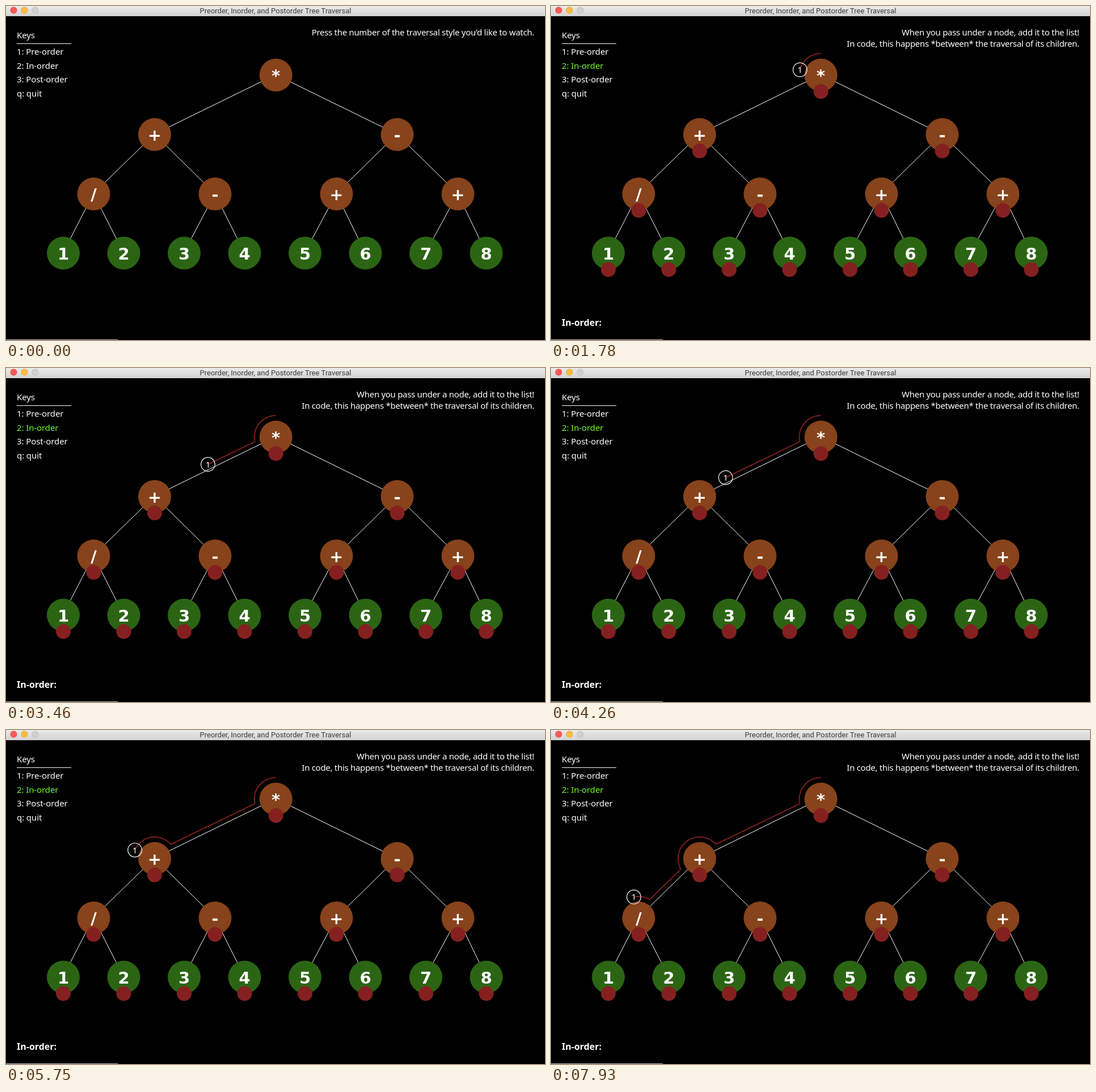
An HTML page with a canvas that plays this animation: 950 by 590 pixels, repeating every 7990 ms.

```html
<!DOCTYPE html>
<html lang="en">
<head>
<meta charset="utf-8">
<title>Tree Traversal</title>
<style>
  html, body { margin: 0; width: 100%; height: 100%; overflow: hidden; background: #000; }
  canvas { display: block; }
</style>
</head>
<body>
<canvas id="stage" width="950" height="590"></canvas>
<script>
const ctx = document.getElementById('stage').getContext('2d');
const LOOP = 7990, START = 1020, FIRST_TICK = 1310, TICK = 57.565;
const BROWN = '#87431b', GREEN = '#2b6514', RED = '#852020', LIME = '#73f930';
const SANS = '"Noto Sans", sans-serif';
const BODY = `15px ${SANS}`;
const NODE_RADIUS = 29, ORBIT = 38;

// Heap order: the children of node i are 2i + 1 and 2i + 2.
const levels = [
  { y: 122, x: 475.7, gap: 0 },
  { y: 227, x: 262, gap: 427.5 },
  { y: 332, x: 154.5, gap: 214 },
  { y: 436.5, x: 101, gap: 106.5 }
];
const nodes = [...'*+-/-++12345678'].map((label, i) => {
  const depth = Math.floor(Math.log2(i + 1));
  const { x, y, gap } = levels[depth];
  return { label, x: x + gap * (i + 1 - 2 ** depth), y, color: depth < 3 ? BROWN : GREEN };
});

function orbit(node, degrees) {
  const a = degrees * Math.PI / 180;
  return [node.x + ORBIT * Math.cos(a), node.y - ORBIT * Math.sin(a)];
}
const arc = (node, from, to) => k => orbit(node, from + (to - from) * k);
const line = ([x1, y1], [x2, y2]) => k => [x1 + (x2 - x1) * k, y1 + (y2 - y1) * k];

// Parts of the walk, timed in ticks.
const [root, left, , leftLeft] = nodes;
const route = [
  { from: -5, to: 12.6, at: arc(root, 90, 192.5) },
  { from: 13, to: 56, at: line(orbit(root, 192.5), orbit(left, 41.3)) },
  { from: 56, to: 86.6, at: arc(left, 41.3, 209.6) },
  { from: 86.6, to: 107, at: line(orbit(left, 209.6), orbit(leftLeft, 59)) },
  { from: 107, to: 115, at: arc(leftLeft, 59, 103) }
];

function walkerAt(tick) {
  const part = route.find(p => tick < p.to) || route[route.length - 1];
  const k = (tick - part.from) / (part.to - part.from);
  return part.at(Math.max(0, Math.min(1, k)));
}

// The walker advances in whole ticks, after two longer holds at the start.
function tickAt(t) {
  if (t < 1170) return -5;
  if (t < FIRST_TICK) return -2.4;
  return Math.floor((t - FIRST_TICK) / TICK + 0.15);
}

function disc(x, y, r, color) {
  ctx.fillStyle = color;
  ctx.beginPath();
  ctx.arc(x, y, r, 0, 2 * Math.PI);
  ctx.fill();
}

function strokePath(points, color, width) {
  ctx.strokeStyle = color;
  ctx.lineWidth = width;
  ctx.beginPath();
  points.forEach(([x, y]) => ctx.lineTo(x, y));
  ctx.stroke();
}

function write(text, x, y, { font = BODY, color = '#fff', align = 'left', spacing = 0 } = {}) {
  ctx.font = font;
  ctx.fillStyle = color;
  ctx.textAlign = align;
  ctx.letterSpacing = spacing + 'px';
  ctx.fillText(text, x, y);
}

function drawWindow() {
  ctx.fillStyle = '#000';
  ctx.fillRect(0, 0, 950, 590);
  const bar = ctx.createLinearGradient(0, 0, 0, 18);
  bar.addColorStop(0, '#ebebeb');
  bar.addColorStop(1, '#d2d2d2');
  ctx.fillStyle = bar;
  ctx.fillRect(0, 0, 950, 18);
  [['#fc5b57', '#df4744'], ['#fdbc40', '#dea034'], ['#d0d0d0', '#b8b8b8']].forEach(([fill, rim], i) => {
    disc(13.5 + 19 * i, 7.5, 6, rim);
    disc(13.5 + 19 * i, 7.5, 5.3, fill);
  });
  write('Preorder, Inorder, and Postorder Tree Traversal', 475, 12.5,
    { font: '13px Roboto, sans-serif', color: '#3c3c3c', align: 'center' });
  ctx.fillStyle = '#bbb';
  ctx.fillRect(0, 589, 197, 1);
}

function drawText(running) {
  const keys = { spacing: -0.1 };
  write('Keys', 19, 57, keys);
  strokePath([[19, 66.5], [115, 66.5]], '#fff', 1);
  ['1: Pre-order', '2: In-order', '3: Post-order', 'q: quit'].forEach((text, i) =>
    write(text, 19, Math.round(86 + 24.7 * i), { ...keys, color: running && i === 1 ? LIME : '#fff' }));

  const message = running
    ? ['When you pass under a node, add it to the list!',
       'In code, this happens *between* the traversal of its children.']
    : ["Press the number of the traversal style you'd like to watch."];
  message.forEach((text, i) =>
    write(text, 931, 52 + 20 * i, { align: 'right', spacing: -0.3 }));
  if (running) write('In-order:', 19, 565, { font: `bold 16px ${SANS}` });
}

function drawTree(running) {
  ctx.save();
  ctx.translate(-0.4, -0.7);
  nodes.slice(1).forEach((node, i) => {
    const parent = nodes[i >> 1];
    strokePath([[parent.x, parent.y], [node.x, node.y]], '#fff', 1);
  });
  ctx.restore();
  for (const { x, y, label, color } of nodes) {
    disc(x, y, NODE_RADIUS, color);
    write(label, x, y + 11, { font: 'bold 29px "DejaVu Sans", sans-serif', align: 'center' });
    if (running) disc(x, y + NODE_RADIUS, 13, RED);
  }
}

function drawWalker(now) {
  const trail = [];
  for (let tick = route[0].from; tick < now; tick += 0.5) trail.push(walkerAt(tick));
  const [x, y] = walkerAt(now);
  trail.push([x, y]);
  strokePath(trail, RED, 1.8);
  ctx.strokeStyle = '#fff';
  ctx.lineWidth = 1.2;
  ctx.beginPath();
  ctx.arc(x, y, 12.3, 0, 2 * Math.PI);
  ctx.stroke();
  write('1', x, y + 5.5, { align: 'center' });
}

function render(now) {
  const t = now % LOOP;
  const running = t >= START;
  drawWindow();
  drawText(running);
  drawTree(running);
  if (running) drawWalker(tickAt(t));
}

const origin = performance.now();
function frame() {
  render(performance.now() - origin);
  requestAnimationFrame(frame);
}
frame();
</script>
</body>
</html>
```
